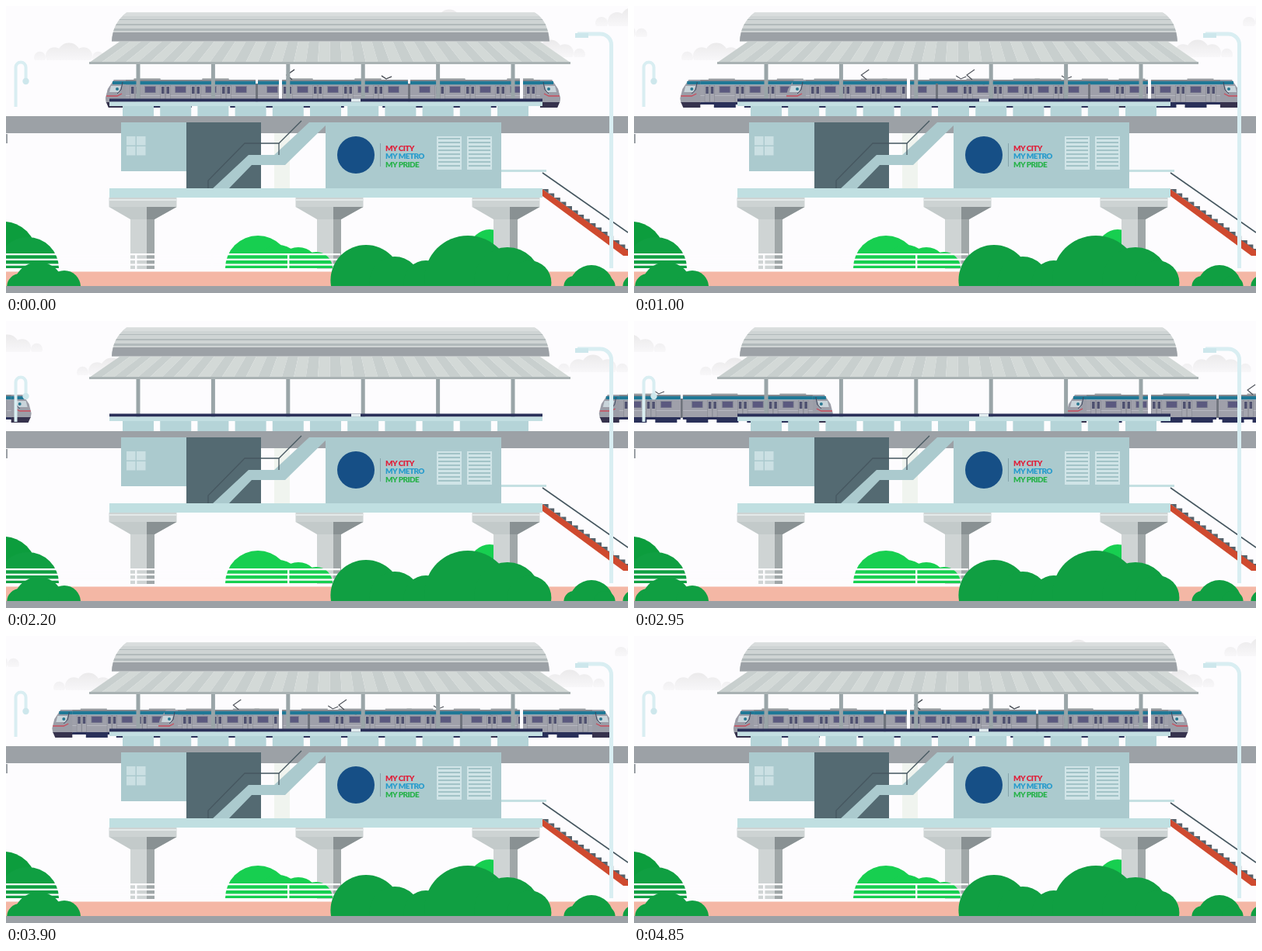
Animation of 800x370 px, one loop 4.9 s. Source, as an HTML page with a canvas:

```html
<!DOCTYPE html>
<html lang="en">
<head>
<meta charset="utf-8">
<title>Metro station</title>
<style>
  html, body { margin: 0; width: 100%; height: 100%; overflow: hidden; background: #fdfcfe; }
  canvas { display: block; }
</style>
</head>
<body>
<canvas id="stage" width="800" height="370"></canvas>
<script>
const ctx = document.getElementById('stage').getContext('2d');
const LOOP = 4900, STEP = 50;
const TRAIN_LEFT = 128, CAR = 193, CAR_PITCH = 196, TRAIN_LENGTH = 2 * CAR_PITCH + CAR;
const PLATFORM = 133, PLATFORM_WIDTH = 557;
const SKY = '#fdfcfe', STEEL = '#9ca1a6', WALL = '#abcace', NAVY = '#2a3059', RAIL = '#465760';

const range = n => Array.from({ length: n }, (_, i) => i);

function box(x, y, w, h, color) {
  ctx.fillStyle = color;
  ctx.fillRect(x, y, w, h);
}

function trace(points) {
  ctx.beginPath();
  for (let i = 0; i < points.length; i += 2) ctx.lineTo(points[i], points[i + 1]);
}

function poly(color, ...points) {
  trace(points);
  ctx.fillStyle = color;
  ctx.fill();
}

function line(color, width, ...points) {
  trace(points);
  ctx.strokeStyle = color;
  ctx.lineWidth = width;
  ctx.stroke();
}

function disc(color, x, y, r) {
  ctx.beginPath();
  ctx.arc(x, y, r, 0, Math.PI * 2);
  ctx.fillStyle = color;
  ctx.fill();
}

// Runs paint with everything below the base line cut off.
function above(base, paint) {
  ctx.save();
  ctx.beginPath();
  ctx.rect(0, 0, 800, base);
  ctx.clip();
  paint();
  ctx.restore();
}

// Domes are [x, height]; roundness is radius over height.
function bush(color, base, roundness, ...domes) {
  above(base, () => domes.forEach(([x, height]) =>
    disc(color, x, base - height + height * roundness, height * roundness)));
}

// Five lobes shrinking away from the middle, fading out towards the base.
function cloud(x, base, r) {
  const fade = ctx.createLinearGradient(0, base - 1.5 * r, 0, base);
  fade.addColorStop(0, '#ebeaeb');
  fade.addColorStop(1, '#f8f7f9');
  above(base, () => range(5).forEach(i => {
    const k = i - 2, lobe = r * (1 - Math.abs(k) / 4);
    disc(fade, x + 1.25 * r * k, base - lobe / 2, lobe);
  }));
}

function clouds(t) {
  const drift = 25 * t;
  cloud(81 + drift, 70, 15);
  cloud(700 + drift, 66, 15);
  cloud(806 + drift, 26, 16);
  cloud(drift - 53, 40, 15);
  cloud(570 + drift, 27 + 4 * t, 15);
}

function cab() {
  poly('#9b9da7', 11, 94, 26, 94, 26, 124, 1, 124, 0, 118, 3, 106);
  box(9, 96, 17, 4, '#1f7896');
  poly('#36324d', 1, 123, 26, 123, 26, 130, 4, 130);
  poly('#c9d4da', 7, 102, 20, 102, 17, 110, 5, 110);
  line('#3c4961', 1, 22, 97, 20, 107, 15, 112);
  line('#c94c5c', 1.3, 1, 115, 15, 115, 21, 112);
  disc('#2a7890', 15, 106, 2);
}

function car(left) {
  const mid = left + CAR / 2, inset = 14;
  const from = Math.max(left, inset), width = Math.min(left + CAR, TRAIN_LENGTH - inset) - from;
  box(from, 94, width, 2, '#85888f');
  box(from, 96, width, 4.5, '#1f7896');
  box(from, 100.5, width, 23, '#9fa0aa');
  box(from, 114, width, 1, '#b6b8c0');
  box(from, 123, width, 3, NAVY);
  for (const dx of [-60, 28]) box(mid + dx, 92.5, 34, 1.5, '#a4a7aa');
  // Doors and windows alternate along the side.
  for (let k = -4; k <= 4; k++) {
    const x = mid + 19.5 * k;
    if (x < 25 || x > TRAIN_LENGTH - 25) continue;
    if (k % 2) {
      box(x - 6.5, 101, 13, 22, '#83858f');
      for (const leaf of [x - 6, x + 0.5]) {
        box(leaf, 101.5, 5.5, 21, '#a5a6af');
        box(leaf + 1, 103, 3.5, 9, '#4e506f');
      }
    } else {
      box(x - 7.5, 102, 15, 9, '#858896');
      box(x - 6.5, 103, 13, 7.5, '#5b597f');
      box(x - 14, 124, 28, 6, NAVY);
    }
  }
}

function train(x) {
  ctx.save();
  ctx.translate(x, 1);
  for (const i of range(3)) {
    car(i * CAR_PITCH);
    if (i) box(i * CAR_PITCH - 3, 99, 3, 25, '#6f737c');
  }
  cab();
  line('#4c5058', 1.1, 243, 81, 233, 88, 240, 94);
  line('#4c5058', 1.1, 355, 89, 361, 93, 368, 90);
  ctx.translate(TRAIN_LENGTH, 0);
  ctx.scale(-1, 1);
  cab();
  ctx.restore();
}

function roof() {
  const stripes = 40;
  const top = k => 146 + 541 * k / stripes;
  const foot = k => 107 + 619 * k / stripes;
  for (const i of range(stripes)) {
    poly(i % 2 ? '#d3d9d7' : '#c8cfce', top(i), 46, top(i + 1), 46, foot(i + 1), 73, foot(i), 73);
  }
  box(107, 72, 619, 3, '#a9b2b3');

  ctx.save();
  ctx.beginPath();
  ctx.moveTo(136, 45.5);
  ctx.quadraticCurveTo(137, 22, 155, 8.5);
  ctx.lineTo(680, 8.5);
  ctx.quadraticCurveTo(697, 18, 699, 45.5);
  ctx.clip();
  box(130, 8, 580, 38, '#cfd4d4');
  box(130, 8, 580, 5, '#d9dddd');
  for (const i of range(3)) box(130, 17 + 6 * i, 580, 1 + i, '#b2babb');
  box(130, 34, 580, 12, STEEL);
  ctx.restore();
}

function pier(x) {
  box(x - 43.5, 247, 87, 12, '#cdd3d3');
  box(x - 43.5, 249, 87, 2, '#e4e9e9');
  poly('#c3caca', x - 43.5, 259, x + 43.5, 259, x + 15, 275, x - 16, 275);
  poly('#899193', x + 5, 259, x + 43.5, 259, x + 15, 275, x + 5, 275);
  box(x - 16, 275, 31, 64, '#cfd4d4');
  box(x + 5, 275, 10, 64, '#a0a7a8');
}

function building() {
  box(148, 150, 84, 63, WALL);
  for (const i of range(4)) box(155 + 13 * (i % 2), 168 + 13 * (i >> 1), 11.5, 11.5, '#cbe0e3');
  box(328, 164, 83, 72, SKY);
  box(345, 164, 20, 72, '#f0f4ef');
  box(232, 150, 96, 86, '#546a72');
  poly(WALL, 265, 236, 312, 192, 345, 192, 390, 150, 411, 150, 411, 154, 359, 205, 316, 205, 286, 236);
  line(RAIL, 1.3, 380, 148, 351, 177, 307, 177, 260, 225, 260, 236);
  line(RAIL, 1.3, 351, 177, 351, 192);

  box(411, 150, 226, 86, WALL);
  for (const x of [554, 593]) {
    box(x, 168, 32, 43, '#d0e4e7');
    for (const i of range(8)) box(x + 2, 170 + 5 * i, 28, 2, '#a2c3c7');
  }
  disc('#164f86', 450, 192, 24);
  box(481, 177, 1, 30, '#84a4aa');
  ctx.font = '900 10px Lato, sans-serif';
  ctx.letterSpacing = '-0.6px';
  [['MY CITY', '#df203b'], ['MY METRO', '#279bcc'], ['MY PRIDE', '#28b24b']].forEach(([text, color], i) => {
    ctx.fillStyle = color;
    ctx.fillText(text, 488, 187 + 10.3 * i);
  });
  box(PLATFORM, 235, PLATFORM_WIDTH, 12, '#c0dfe1');
}

function stairs() {
  box(637, 211, 58, 3, '#c5e0e2');
  line(RAIL, 1.6, 690, 215, 800, 292);
  poly('#cf4a2f', 690, 236, 800, 315, 800, 322, 794, 322, 690, 245);
  for (const i of range(15)) {
    const x = 690 + 7.6 * i, y = 236 + 5.5 * i;
    poly('#56616a', x, y, x + 7.6, y, x + 7.6, y + 5.5);
  }
}

// A post bent over at the top, ending at (tipX, tipY).
function lamp(x, foot, top, bend, width, tipX, tipY) {
  ctx.beginPath();
  ctx.moveTo(x, foot);
  ctx.arcTo(x, top, tipX, top, bend);
  ctx.arcTo(tipX, top, tipX, tipY, Math.min(bend, tipY - top));
  ctx.lineTo(tipX, tipY);
  ctx.strokeStyle = '#d9eef2';
  ctx.lineWidth = width;
  ctx.stroke();
}

function lamps() {
  lamp(12.5, 130, 72.5, 6.5, 4, 25.5, 95);
  disc('#cde7ec', 25.5, 97, 4.2);
  lamp(778.5, 338, 36, 14, 5, 735, 36);
  box(732, 35, 17, 6, '#cde7ec');
}

function garden() {
  const leaf = '#109f42';
  bush('#17cf50', 338, 1, [324, 42], [350, 30], [376, 27], [399, 21]);
  bush('#0c9d3d', 338, 0.7, [-3, 60]);
  bush(leaf, 338, 1, [28, 40]);
  for (const i of range(3)) box(0, 319 + 6.7 * i, 430, 2.3, SKY);
  for (const i of range(4)) box(68 + 98 * i, 319, 2.4, 20, SKY);
  box(0, 342.5, 800, 19, '#f4b7a5');
  box(0, 361, 800, 9, STEEL);
  bush(leaf, 361, 0.86, [463, 53], [500, 38], [540, 33], [594, 65], [645, 50], [673, 33]);
  bush(leaf, 361, 1.05, [18, 16], [42, 31], [75, 20], [731, 13], [753, 27], [770, 13], [808, 14]);
}

function station() {
  for (const i of range(6)) box(167.5 + 96.4 * i, 74, 5, 50, '#9aa5a8');
  for (const x of [351, 661]) box(x, 76, 4, 44, SKY);
  roof();
  box(0, 142, 800, 22, STEEL);
  box(0, 165, 2, 12, STEEL);
  box(PLATFORM, 119.5, PLATFORM_WIDTH, 4, NAVY);
  box(444, 119.5, 12, 4, '#e3edf0');
  box(PLATFORM, 123.5, PLATFORM_WIDTH, 5.5, '#c3dfe2');
  for (const i of range(11)) box(150 + 48.2 * i, 129, 40, 13, '#b5d4d8');
  building();
  bush('#17cf50', 338, 0.5, [622, 50]);
  [176, 416, 643].forEach(pier);
}

function draw(t) {
  box(0, 0, 800, 370, SKY);
  clouds(t);
  train(TRAIN_LEFT - 53.3 * t ** 2 - 15.4 * t ** 4.2);
  train(TRAIN_LEFT + 54.5 * t ** 2 + 12.5 * t ** 4.3);
  station();
  stairs();
  garden();
  lamps();
}

// The scene runs outward for half the loop and then back again.
function tick(now) {
  const step = Math.floor(now % LOOP / STEP) * STEP;
  draw(Math.min(step, LOOP - step) / 1000);
  requestAnimationFrame(tick);
}
draw(0);
requestAnimationFrame(tick);
</script>
</body>
</html>
```
